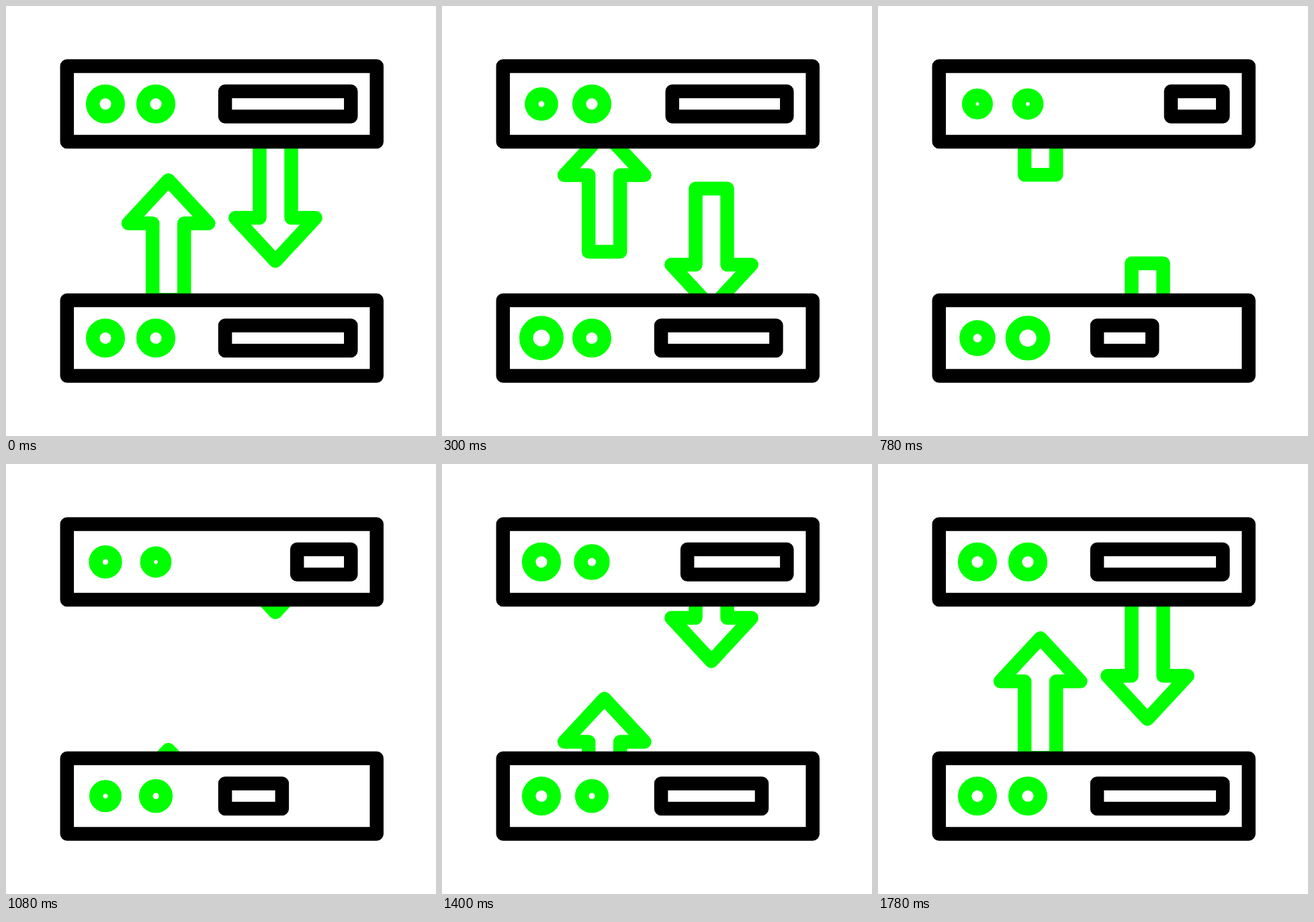
An HTML page with a canvas that plays this animation: 640x640 px, repeating every 1.82 s.

```html
<!DOCTYPE html>
<html lang="en">
<head>
<meta charset="utf-8">
<title>Server transfer</title>
<style>
html, body { margin: 0; width: 100%; height: 100%; overflow: hidden; background: #fff; }
canvas { display: block; width: 640px; height: 640px; }
</style>
</head>
<body>
<canvas id="stage" width="640" height="640"></canvas>
<script>
const ctx = document.getElementById('stage').getContext('2d');
const LOOP = 1820, END = 1780, STEP = 20;
const GREEN = '#00ff00', BLACK = '#000', WHITE = '#fff', LINE = 20.5;

const clamp = x => Math.min(1, Math.max(0, x));
const progress = (t, from, to) => clamp((t - from) / (to - from));
const smooth = x => x * x * (3 - 2 * x);

// Cubic easing with flat ends
function ease(x, x1, x2) {
  let lo = 0, hi = 1;
  for (let i = 0; i < 24; i++) {
    const u = (lo + hi) / 2, v = 1 - u;
    if (3 * u * v * v * x1 + 3 * u * u * v * x2 + u * u * u < x) lo = u;
    else hi = u;
  }
  return smooth(lo);
}

// Drive bars: out, then back
function slide(t) {
  const turn = 900;
  return t < turn
    ? ease(progress(t, 0, turn), 0.62, 0.45)
    : 1 - ease(progress(t, turn, END), 0.615, 0.4);
}

// Upper lamps shrink once
function dip(t, from, to) {
  return -6.1 * Math.max(0, Math.sin(Math.PI * progress(t, from, to))) ** 0.8;
}

// Lower lamps grow, shrink, then settle
function swing(t, from, high, low, to) {
  const up = 5.2, down = 5.8;
  return up * smooth(progress(t, from, high))
    - (up + down) * smooth(progress(t, high, low))
    + down * smooth(progress(t, low, to));
}

function box(x1, y1, x2, y2) {
  ctx.beginPath();
  ctx.rect(x1, y1, x2 - x1, y2 - y1);
  ctx.fillStyle = WHITE;
  ctx.fill();
  ctx.strokeStyle = BLACK;
  ctx.stroke();
}

function lamp(x, y, grow) {
  ctx.beginPath();
  ctx.arc(x, y, 18.8 + grow, 0, Math.PI * 2);
  ctx.strokeStyle = GREEN;
  ctx.stroke();
}

function arrow(x, tip, bar, tail) {
  const half = 59.7, shaft = 23.5;
  ctx.beginPath();
  ctx.moveTo(x, tip);
  ctx.lineTo(x + half, bar);
  ctx.lineTo(x + shaft, bar);
  ctx.lineTo(x + shaft, tail);
  ctx.lineTo(x - shaft, tail);
  ctx.lineTo(x - shaft, bar);
  ctx.lineTo(x - half, bar);
  ctx.closePath();
  ctx.strokeStyle = GREEN;
  ctx.stroke();
}

const upArrow = d => arrow(241.7, 259.3 + d, 323.4 + d, 437.2 + d);
const downArrow = d => arrow(401, 379.6 + d, 315.3 + d, 202.1 + d);

function draw(t) {
  ctx.fillStyle = WHITE;
  ctx.fillRect(0, 0, 640, 640);
  ctx.lineWidth = LINE;
  ctx.lineJoin = 'round';

  // One pair leaves while the next one arrives
  const left = END - t;
  ctx.save();
  ctx.beginPath();
  ctx.rect(0, 202, 640, 236);
  ctx.clip();
  upArrow(-0.2385 * t);
  upArrow(0.237 * left);
  downArrow(0.232 * t);
  downArrow(-0.2268 * left);
  ctx.restore();

  box(90.8, 89.4, 551.7, 202);
  box(90.8, 438.1, 551.7, 550.4);

  const s = slide(t);
  box(326.1 + 112.5 * s, 127, 513.3, 164.6);
  box(326.1, 475.4, 513.3 - 107.6 * s, 512.9);

  lamp(148, 145.8, dip(t, 0, 1400));
  lamp(223, 145.8, dip(t, 340, 1520));
  lamp(148, 494.2, swing(t, 0, 445, 985, 1400));
  lamp(223, 494.2, swing(t, 300, 680, 1220, 1700));
}

const start = performance.now();
function tick() {
  const t = (performance.now() - start) % LOOP;
  draw(Math.min(END, Math.floor(t / STEP) * STEP));
  requestAnimationFrame(tick);
}
tick();
</script>
</body>
</html>
```
